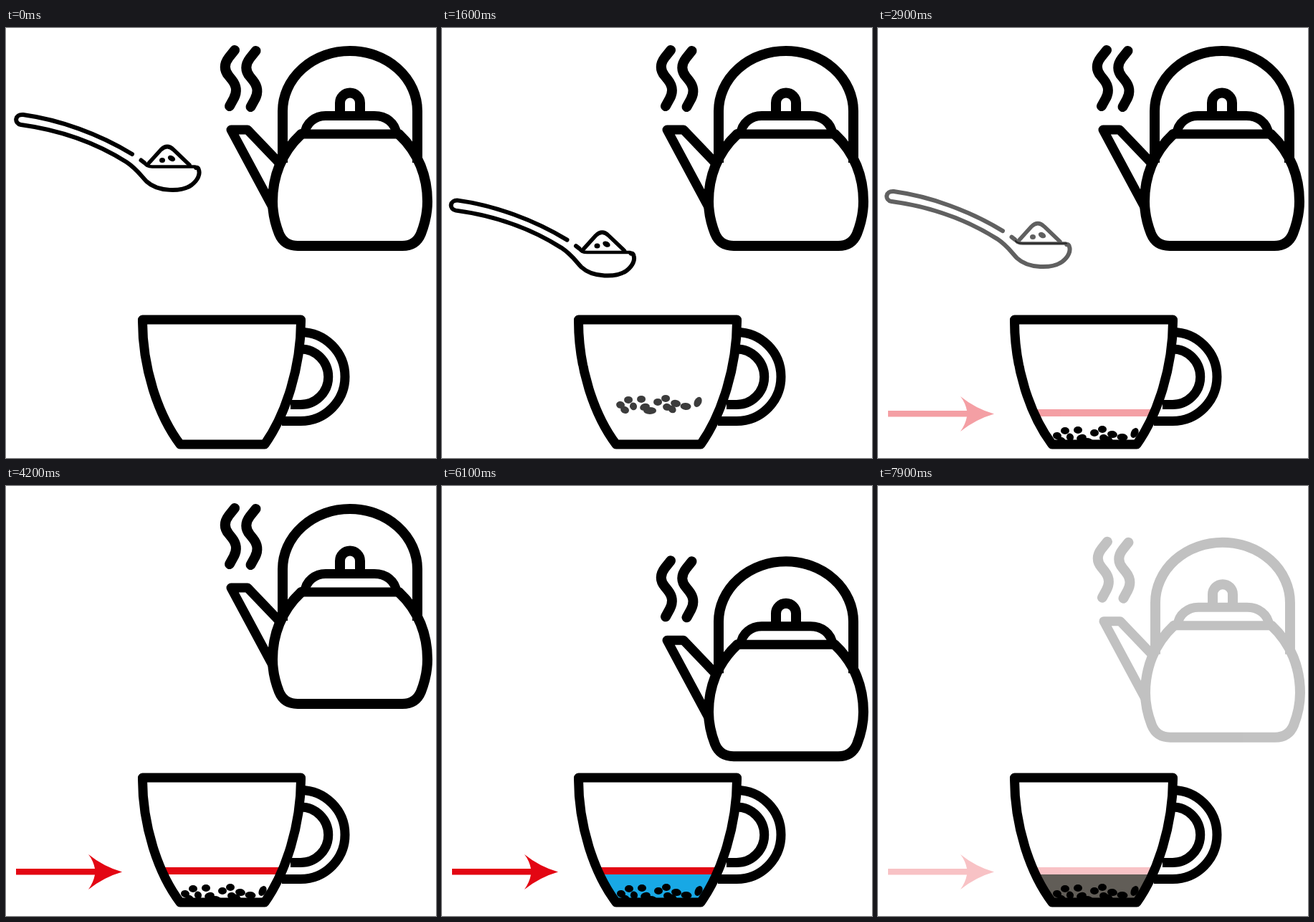
Recreate the animation shown at these times as an HTML page. Size 600 px wide and 600 px high, loop 8 s.

```html
<!DOCTYPE html>
<html lang="en">
<head>
<meta charset="utf-8">
<title>Making a cup</title>
<style>
  html, body { margin: 0; width: 100%; height: 100%; overflow: hidden; background: #fff; }
  svg { display: block; width: 100vw; height: 100vh; }
  .line { fill: none; stroke: #000; stroke-linecap: round; stroke-linejoin: round; }
  .butt { stroke-linecap: butt; }
</style>
</head>
<body>
<svg viewBox="0 0 600 600">
  <g id="spoon">
    <g class="line" stroke-width="6">
      <path d="M176 176C130 148 75 128 24 121C12 120 11 133 21 135C80 143 130 163 168 187C183 197 189 207 196 214C212 229 245 229 259 219C268 212 271 204 269 198Q268 194 265 195"/>
      <path d="M188.500 184.500L193 188"/>
      <path stroke-width="4.500" d="M193 188Q196 193.500 204 193.500H264"/>
      <path stroke-width="5.500" d="M197 191L216 170Q225 161 234 170L256 191"/>
    </g>
    <ellipse cx="218" cy="184.500" rx="4" ry="3.500"/>
    <ellipse cx="231" cy="182" rx="5.500" ry="3.800" transform="rotate(28 231 182)"/>
  </g>
  <path id="rim" class="line" stroke-width="2" d="M194 190Q197 193.500 204 193.500H265"/>

  <g id="kettle" class="line" stroke-width="14">
    <path id="steam" d="M319 31L311 41C304 50 304 59 311 67L315 72C323 82 322 90 318 98L312 109"/>
    <use href="#steam" x="29.500" y="1"/>
    <path class="butt" d="M386 188V116A94 84 0 0 1 574 116V188"/>
    <path class="butt" d="M466 120V104.500A14 14 0 0 1 494 104.500V120"/>
    <path class="butt" stroke-width="13" d="M417 148C418 132 432 122.500 446 122.500H514C530 122.500 543 132 545 148"/>
    <path stroke-width="13" d="M412 148H548"/>
    <path stroke-width="13" class="butt" d="M382 189L337 142H314L372 250"/>
    <path d="M412 148C384 174 372 208 372 242Q372 264 381 287Q388 304 407 304H553Q572 304 579 287Q588 264 588 242C588 208 576 174 548 148"/>
  </g>

  <path id="water" fill="#009fe3" d="M220 542H382L361 581H243Z"/>
  <path id="brew" fill="#443226" d="M220 542H382L361 581H243Z"/>
  <g id="grains"></g>
  <g id="marker" fill="#e30613">
    <path d="M218 532H384V542H218Z"/>
    <path d="M14 534H124Q122 523 115 514Q136 531 162 538.500Q136 546 115 563Q122 553 124 542.500H14Z"/>
  </g>

  <g class="line" stroke-width="13">
    <path d="M191 407H411.500C412 473 390 540 361 581H243C212 540 190 473 190.500 407Z"/>
    <path class="butt" d="M411 424.500A62 62 0 0 1 411 548.500H385"/>
    <path class="butt" d="M411 448A38.700 38.700 0 0 1 411 525.500H397"/>
  </g>
</svg>
<script>
const LOOP = 8000, STEP = 100, PHASE = 2100;
const $ = id => document.getElementById(id);

// Resting place of each grain: x, y, half width, tilt.
const grains = [
  [250, 569, 6, 10], [256, 576, 6, 20], [261, 562, 6, 0], [268, 571, 5.5, 70],
  [279, 561, 6, 0], [284, 572, 7, -15], [291, 577, 9, 0], [302, 565, 6, 0],
  [313, 560, 6, 0], [315, 572, 6, 10], [322, 575, 6, 40], [327, 567, 7, 10],
  [341, 571, 7.5, 5], [358, 565, 7.5, -62]
];
$('grains').innerHTML = grains.map(([x, y, r, tilt]) =>
  `<ellipse cx="${x}" cy="${y}" rx="${r}" ry="5" transform="rotate(${tilt} ${x} ${y})"/>`).join('');

const phase = (t, n) => Math.min(1, Math.max(0, (t - n * PHASE) / PHASE));

function place(id, x, y, opacity) {
  $(id).setAttribute('transform', `translate(${x} ${y})`);
  $(id).setAttribute('opacity', opacity);
}

function draw(t) {
  const [dip, mark, pour, steep] = [0, 1, 2, 3].map(n => phase(t, n));
  const spoonY = 157 * dip - 131 * mark;
  place('spoon', -2 * dip, spoonY, 1 - mark);
  place('rim', -2 * dip, spoonY, 1 - mark);
  place('grains', -4 * (1 - dip), -181 * (1 - dip), dip);
  place('marker', 0, 0, mark * (1 - steep));
  place('kettle', 1.3 * steep, 81 * pour - 45 * steep, 1 - steep);
  place('water', 0, 0, pour * (1 - steep));
  place('brew', 0, 0, steep);
}

const start = performance.now();
function tick() {
  const t = (performance.now() - start) % LOOP;
  draw(Math.floor(t / STEP) * STEP);
  requestAnimationFrame(tick);
}
tick();
</script>
</body>
</html>
```
